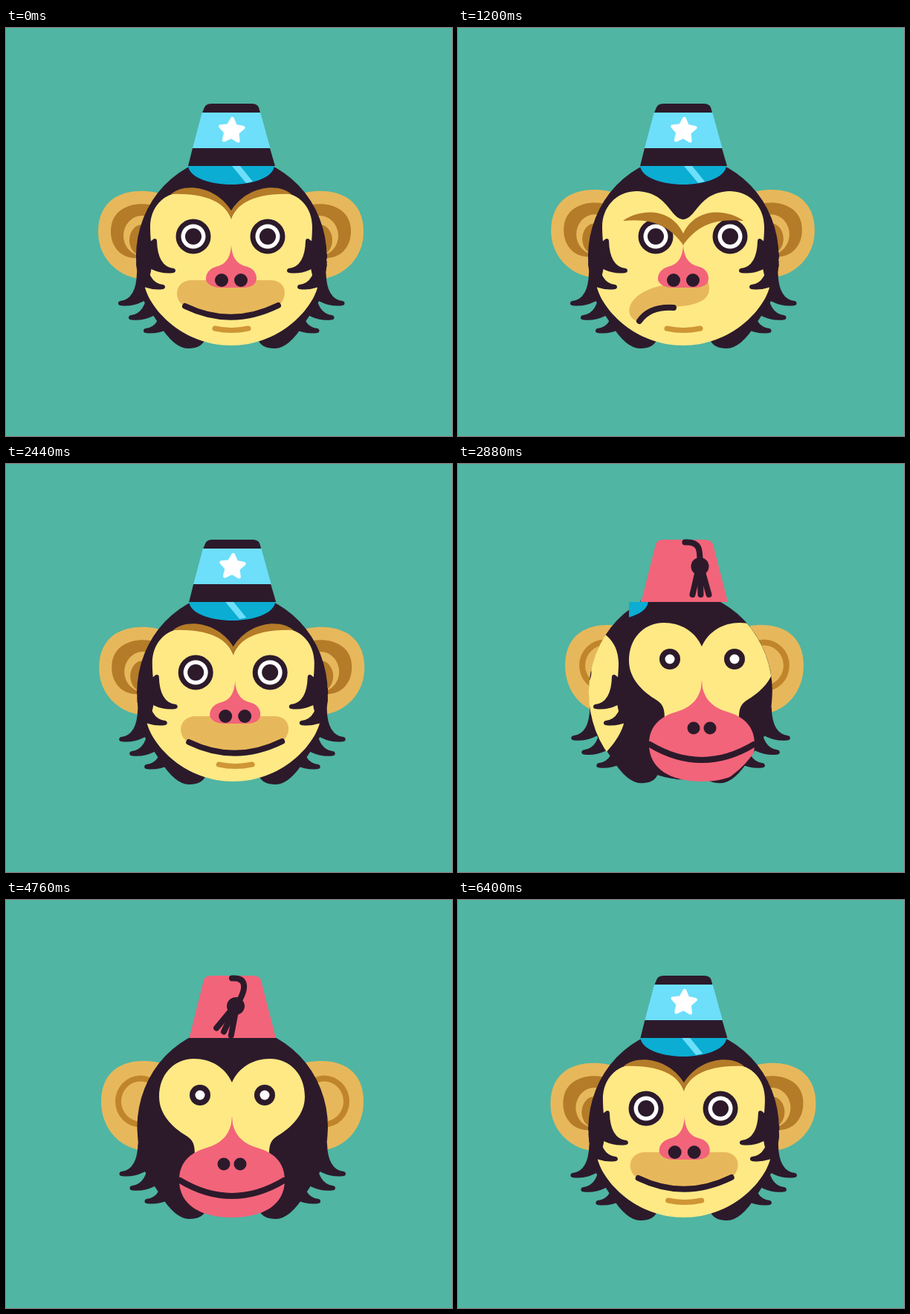
Animation, 600 px wide and 550 px high, one loop 6440 ms. Source, as an HTML page with a canvas:

```html
<!DOCTYPE html>
<html lang="en">
<head>
<meta charset="utf-8">
<title>Monkey</title>
<style>
  html, body { margin: 0; width: 100%; height: 100%; overflow: hidden; background: #50b5a3; }
  canvas { display: block; }
</style>
</head>
<body>
<canvas id="stage" width="600" height="550"></canvas>
<script>
const ctx = document.getElementById('stage').getContext('2d');
const LOOP = 6440, STEP = 40, FACE_TRAVEL = 220, BRIM_TRAVEL = 118;
const TEAL = '#50b5a3', DARK = '#2c1a2b', YELLOW = '#ffe985', TAN = '#e7b85b', BROWN = '#b47b28',
  OCHRE = '#cf9635', PINK = '#f2647a', SKY = '#6ddffa', CYAN = '#0badd3', WHITE = '#fff';

const portion = (t, a, b) => Math.min(1, Math.max(0, (t - a) / (b - a)));
const ramp = (t, a, b) => (1 - Math.cos(Math.PI * portion(t, a, b))) / 2;
const bump = (t, a, b) => Math.sin(Math.PI * portion(t, a, b));

// Blend two path strings of the same structure.
function mix(a, b, p) {
  const number = /-?[\d.]+/g, ends = b.match(number);
  let i = 0;
  return a.replace(number, v => +v + (ends[i++] - v) * p);
}

function fill(d, color) {
  ctx.fillStyle = color;
  ctx.fill(new Path2D(d));
}
function line(d, color, width) {
  ctx.strokeStyle = color;
  ctx.lineWidth = width;
  ctx.lineCap = ctx.lineJoin = 'round';
  ctx.stroke(new Path2D(d));
}
function oval(x, y, rx, color, ry = rx) {
  ctx.fillStyle = color;
  ctx.beginPath();
  ctx.ellipse(x, y, rx, ry, 0, 0, 7);
  ctx.fill();
}
function at(x, y, draw) {
  ctx.save();
  ctx.translate(x, y);
  draw();
  ctx.restore();
}
function mirrored(axis, draw) {
  draw();
  at(2 * axis, 0, () => { ctx.scale(-1, 1); draw(); });
}
function clipRect(x0, x1, draw) {
  ctx.save();
  ctx.beginPath();
  ctx.rect(x0, 0, Math.max(0, x1 - x0), 550);
  ctx.clip();
  draw();
  ctx.restore();
}

// A lock of fur with its tip at x, y; side 1 grows from the right, -1 from the left.
function tuft(x, y, side) {
  at(x, y, () => {
    ctx.scale(side, 1);
    const d = 'M0 0 Q24 -3 25 -40 L50 -20 Q24 4 0 0 Z';
    fill(d, DARK);
    line(d, DARK, 6);
  });
}

function halfSkull() {
  fill(`M304 173 A128.5 135 0 0 0 175 308 C176 345 182 350 184 366 L205 398
    Q226 432 245 432 Q262 432 267 421 Q285 427 304 427 Z`, DARK);
  for (let i = 0; i < 3; i++) tuft(154 + 11 * i + 3 * i * i, 371 + 20 * i - .75 * i * i, 1);
}

const LOBE_REST = ' M303.5 258 C297 241 279 222 239 222 ';
const LOBE_ANGRY = ' M303.5 258 C285 258 283 220 239 220 ';
const CHEEK = 'C212 221 194 242 194 268 C194 300 203 320 187 350 C195 380 238 428 303.5 428 Z';
const BROW = ['M222 224 C240 208 283 213 303.5 247 L303.5 258 C297 241 279 222 222 224 Z',
  'M222 260 C240 246 285 238 303.5 278 L303.5 293 C285 268 265 256 222 260 Z'];
const MUZZLE = ['M250 340 L356 340 C380 340 380 368 363 376 Q303 404 242 376 C224 368 226 340 250 340 Z',
  'M275 347 L336 340 C343 362 332 373 292 376 Q262 376 243 396 C222 390 224 358 275 347 Z'];
const MOUTH = ['M241 375 Q303 405 366 374', 'M244 395 Q258 375 290 377'];
const NOSE = `M303 292 C304 316 317 320 325 322 C336 325 339 337 336 342 Q333 350 316 350
  H290 Q273 350 269 340 C268 330 275 324 282 322 C290 320 302 316 303 292 Z`;

function blueFace({ angry, eyeX, lift, yaw }) {
  at(yaw * .4, 0, () => mirrored(303, () => {
    fill(mix(LOBE_REST, LOBE_ANGRY, angry) + CHEEK, YELLOW);
    for (let i = 0; i < 2; i++) tuft(225 - 14 * i, 327 + 22 * i, -1);
  }));
  for (const x of [252, 352]) {
    const cx = x + eyeX + yaw * .5, cy = 281 + lift * .6;
    oval(cx, cy, 23.5, DARK);
    oval(cx, cy, 16.5, WHITE);
    oval(cx, cy, 11, DARK);
  }
  at(yaw, lift, () => {
    fill(mix(...MUZZLE, angry), TAN);
    line(mix(...MOUTH, angry), DARK, 8);
    line('M281 405 Q303 410 326 405', OCHRE, 7);
    fill(NOSE, PINK);
    for (const x of [290, 316]) oval(x, 340, 9, DARK);
  });
  at(yaw * .4, lift * .3, () => mirrored(303, () => fill(mix(...BROW, angry), BROWN)));
}

function fezFace({ lookUp }) {
  const down = 1 - lookUp;
  mirrored(304, () => fill(`M304.5 247 C295 225 275 214 253 214 C225 214 206 236 206 265
    C206 290 225 ${302 + 4 * down} 238 ${309 + 6 * down}
    C252 ${317 + 6 * down} 254 328 254 345 H304.5 Z`, YELLOW));
  for (const x of [261, 348]) {
    oval(x, 254 + 9 * down, 14, DARK);
    oval(x, 254 + 9 * down, 6.5, WHITE);
  }
  at(0, 16 * down, () => mirrored(304, () => fill(`M304.5 275 C303 300 290 312 270 318
    C245 325 233 340 233 362 C233 395 262 412 304.5 412 Z`, PINK)));
  at(0, 19 * down, () => {
    line('M234 359 Q304 401 374 359', DARK, 8);
    for (const x of [293, 315]) oval(x, 337, 8.5, DARK);
  });
}

function blueBrim({ yaw }) {
  fill('M245 186 C247 202 275 211 303 211 C331 211 359 202 361 186 Z', CYAN);
  at(-2.5 * yaw, 0, () => fill('M304 186 H315 L332 207 L323 209 Z', SKY));
}

function blueHat() {
  fill('M251 162 H355 L362 186 H245 Z', DARK);
  fill('M264 113 H342 L355.5 162 H251 Z', SKY);
  fill('M264 114 L267 107 Q269 102 277 102 H330 Q338 102 340 107 L342 114 Z', DARK);
  let star = '';
  for (let i = 0; i < 10; i++) {
    const r = i % 2 ? 8 : 16, a = i * Math.PI / 5 + .06;
    star += `${i ? 'L' : 'M'}${303.5 + r * Math.sin(a)} ${138.5 - r * Math.cos(a)}`;
  }
  fill(star + 'Z', WHITE);
  line(star + 'Z', WHITE, 5);
}

function fezHat({ swing, tasselX }) {
  fill('M246.5 186 L266 108 Q268 102 276 102 H331 Q341 102 343 108 L363 186 Z', PINK);
  at(tasselX, 0, () => {
    const x = 324 - 15 * swing, y = 138 + 5 * swing;
    line(`M304 105.5 C${326 - 3 * swing} 104 ${324 + 2 * swing} 118 ${x} ${y}`, DARK, 8);
    at(x, y, () => {
      ctx.rotate(.46 * swing);
      oval(0, 0, 12, DARK);
      for (const end of [-10, 1, 12]) line(`M${end * .3} 8 L${end} 38`, DARK, 8);
    });
  });
}

function blueEar() {
  fill('M215 226 C190 215 124 212 124 275 C124 310 150 334 179 338 L215 330 Z', TAN);
  fill('M205 241 C180 232 141 238 141 274 C141 298 158 312 178 310 L205 300 Z', BROWN);
  oval(183, 280, 25, TAN, 27);
  oval(183, 286, 17, BROWN, 21);
}
function fezEar() {
  fill('M215 222 C192 213 128 209 128 272 C128 307 152 333 181 337 L215 330 Z', TAN);
  oval(181, 271.5, 34, '#c0852a', 35);
  oval(181, 271.5, 26, TAN, 27);
}

const BLUE = { face: blueFace, hat: blueHat, brim: blueBrim, ear: blueEar, axis: 302.5 };
const FEZ = { face: fezFace, hat: fezHat, brim() {}, ear: fezEar, axis: 304.5 };

function pose(t) {
  const angry = ramp(t, 360, 640) - ramp(t, 1640, 2000);
  const nod = bump(t, 40, 640);
  const lookUp = ramp(t, 3040, 3600) - ramp(t, 4320, 4640);
  const swinging = t - 4760;
  return {
    angry, lookUp,
    lift: -15 * nod,
    blueEars: nod - .3 * angry,
    fezEars: lookUp + .45 * bump(t, 5100, 5600),
    eyeX: -18 * ramp(t, 560, 740) + 32 * ramp(t, 900, 1100) - 14 * ramp(t, 1640, 1960),
    yaw: 4 * bump(t, 2280, 2600) + 3 * bump(t, 6160, 6440),
    hop: 26 * bump(t, 240, 600) + 9 * bump(t, 2480, 2860) + 45 * bump(t, 4000, 4540),
    swing: ramp(t, 4300, 4600) *
      (.45 + .55 * Math.cos(swinging * Math.PI / 250) * Math.exp(-Math.max(0, swinging) / 400)),
  };
}

function render(t) {
  const p = pose(t);
  const leavingFez = t >= 4000;
  const spin = leavingFez ? ramp(t, 5680, 6240) : ramp(t, 2440, 3000);
  const [from, to] = leavingFez ? [FEZ, BLUE] : [BLUE, FEZ];
  const fezShare = leavingFez ? 1 - spin : spin;
  const shown = spin > .5 ? to : from;
  const tuck = 48 * Math.sin(Math.PI * spin);
  const squeeze = Math.min(10, tuck * 1.3);
  const turned = Math.sin(spin * Math.PI / 2);

  ctx.fillStyle = TEAL;
  ctx.fillRect(0, 0, 600, 550);

  // Slides the old part out to the left while the new one follows from the right.
  const slide = (part, travel) => {
    if (spin < 1) at(-travel * spin, 0, () => from[part](p));
    if (spin > 0) at(travel * (1 - spin), 0, () => to[part](p));
  };

  at(p.yaw * .3, 0, () => {
    const earX = shown === FEZ ? -8 * p.fezEars : -4 * p.blueEars;
    const earY = shown === FEZ ? 9 * p.fezEars : 6 * p.blueEars;
    mirrored(shown.axis, () => at(tuck + earX, earY, shown.ear));

    at(1.5 * fezShare, -2 * fezShare, () => {
      halfSkull();
      at(-squeeze, 0, () => at(606.5, 0, () => { ctx.scale(-1, 1); halfSkull(); }));
    });

    ctx.save();
    ctx.beginPath();
    ctx.ellipse(303.5 + fezShare - squeeze / 2, 308, 128.5 - squeeze / 2, 135, 0, 0, 7);
    ctx.clip();
    slide('face', FACE_TRAVEL);
    ctx.restore();

    const edge = 364 - 120 * turned;
    p.tasselX = leavingFez ? -100 * turned : 100 * (1 - turned);
    at(0, -p.hop, () => {
      clipRect(230, 378, () => slide('brim', BRIM_TRAVEL));
      if (spin < 1) clipRect(0, edge, () => from.hat(p));
      if (spin > 0) clipRect(spin < 1 ? edge : 0, 600, () => to.hat(p));
    });
  });
}

const start = performance.now();
function frame() {
  const t = (performance.now() - start) % LOOP;
  render(Math.floor(t / STEP) * STEP);
  requestAnimationFrame(frame);
}
frame();
</script>
</body>
</html>
```
